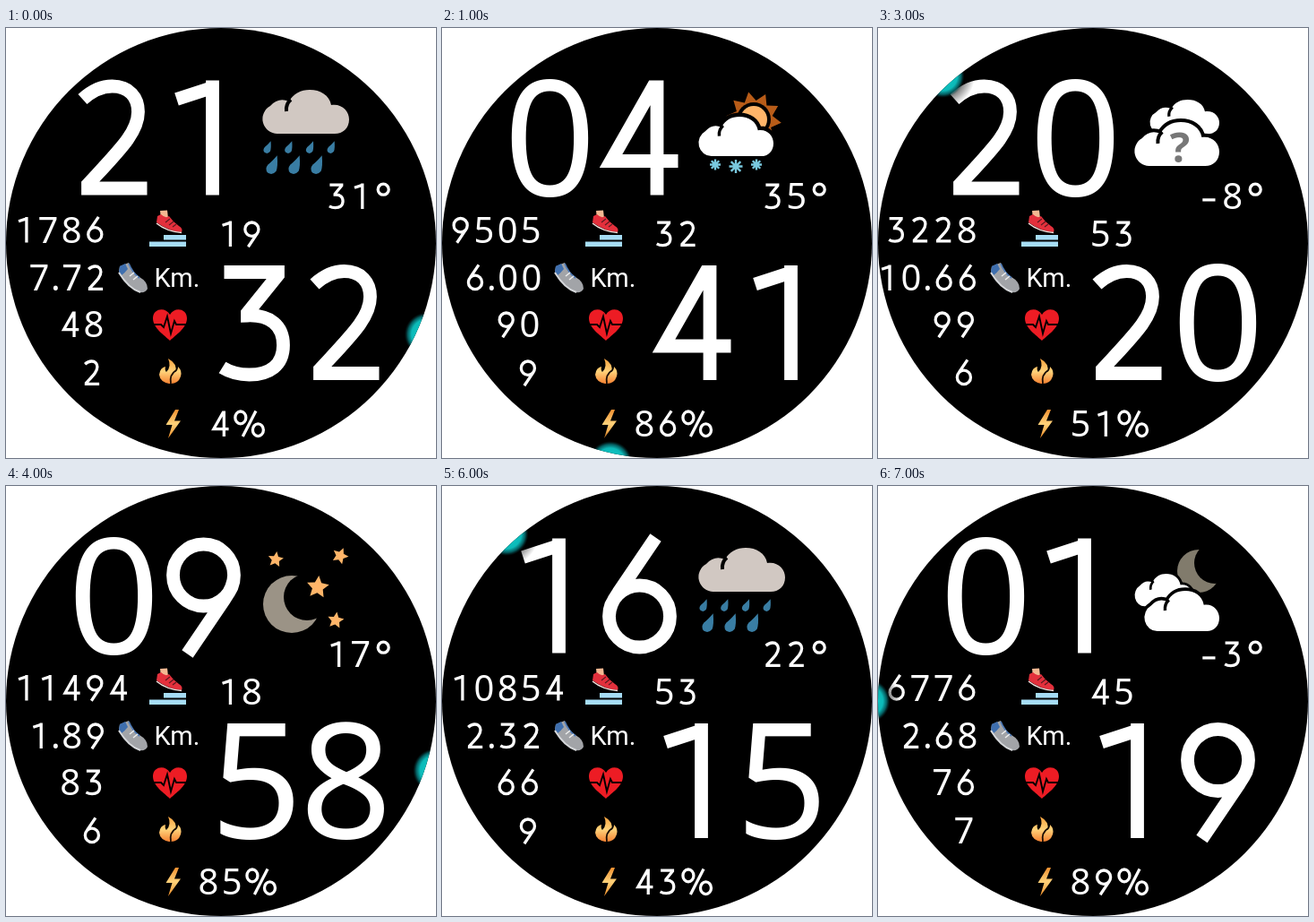
Write an HTML page with a canvas that moves like this. It is 480 px wide and 480 px high and loops after 8000 ms.

```html
<!DOCTYPE html>
<html lang="en">
<head>
<meta charset="utf-8">
<title>Watch face</title>
<style>
  html, body { margin: 0; width: 100%; height: 100%; overflow: hidden; background: #fff; }
  canvas { display: block; width: 480px; height: 480px; }
</style>
</head>
<body>
<canvas id="face" width="480" height="480"></canvas>
<script>
const ctx = document.getElementById('face').getContext('2d');
const STEP = 1000, PITCH = 26.2, SMALL = 40, BIG = 180;
const FONT = '"Noto Sans", sans-serif';

// Humanist numerals, centred on x = 0 with the baseline at y = 0, for size 180.
const SIX = 'M18 -129L-24 -67Q-34 -53 -34 -41A34 34.5 0 1 0 34 -41A34 34.5 0 0 0 -34 -41';
const GLYPHS = {
  1: 'M10 0V-128M13 -121L-30 -107',
  2: 'M-35 -107Q-19 -121.5 -2 -121.5C17 -121.5 27 -109 27 -93C27 -70 7 -51 -29 -12V-7.5H37',
  3: 'M-36 -120.5H24V-117L-10 -75V-72C15 -73 30 -61 30 -39C30 -16 14 -6 -8 -6Q-25 -6 -38 -14',
  4: 'M19.5 0V-120.5H15L-32 -38H43',
  6: SIX,
  9: SIX,
  '-': 'M-32 -46H32',
  '°': 'M27 -98A27 27 0 1 1 -27 -98A27 27 0 1 1 27 -98Z',
  '%': 'M-17 -95A27 31 0 1 1 -71 -95A27 31 0 1 1 -17 -95ZM71 -33A27 31 0 1 1 17 -33A27 31 0 1 1 71 -33ZM-33 0L33 -128'
};
for (const key in GLYPHS) GLYPHS[key] = new Path2D(GLYPHS[key]);

const WIDTHS = { '.': 10.5, '%': 39, '°': 25 };
const widthOf = (char, pitch) => WIDTHS[char] || pitch;

const SCENES = [
  { hour: '21', minute: '32', second: 19, steps: 1786, km: '7.72', pulse: 48, burn: 2, power: 4, temp: 31, sky: rain },
  { hour: '04', minute: '41', second: 32, steps: 9505, km: '6.00', pulse: 90, burn: 9, power: 86, temp: 35, sky: sunSnow },
  { hour: '13', minute: '07', second: 53, steps: 8240, km: '4.15', pulse: 72, burn: 4, power: 67, temp: 8, sky: moonClouds },
  { hour: '20', minute: '20', second: 53, steps: 3228, km: '10.66', pulse: 99, burn: 6, power: 51, temp: -8, sky: unknown },
  { hour: '09', minute: '58', second: 18, steps: 11494, km: '1.89', pulse: 83, burn: 6, power: 85, temp: 17, sky: moonStars },
  { hour: '18', minute: '26', second: 32, steps: 7352, km: '10.24', pulse: 58, burn: 3, power: 72, temp: 24, sky: sunSnow },
  { hour: '16', minute: '15', second: 53, steps: 10854, km: '2.32', pulse: 66, burn: 9, power: 43, temp: 22, sky: rain },
  { hour: '01', minute: '19', second: 45, steps: 6776, km: '2.68', pulse: 76, burn: 7, power: 89, temp: -3, sky: moonClouds }
];

function glyph(char, x, y, size) {
  ctx.fillStyle = ctx.strokeStyle = '#fff';
  if (!GLYPHS[char]) {
    ctx.font = `${size}px ${FONT}`;
    ctx.textAlign = 'center';
    ctx.fillText(char, x, y);
    return;
  }
  ctx.save();
  ctx.translate(x, y);
  ctx.scale(size / BIG, size / BIG);
  if (char === '9') {
    ctx.translate(0, -128);
    ctx.rotate(Math.PI);
  }
  ctx.lineWidth = 14.8;
  ctx.stroke(GLYPHS[char]);
  ctx.restore();
}

// align: 0 = left, 0.5 = centre, 1 = right
function label(value, x, y, align, size = SMALL, pitch = PITCH) {
  const chars = [...String(value)];
  const total = chars.reduce((sum, c) => sum + widthOf(c, pitch), 0);
  let left = x - total * align;
  for (const c of chars) {
    const w = widthOf(c, pitch);
    glyph(c, left + w / 2, y, size);
    left += w;
  }
}

function fill(d, color) {
  ctx.fillStyle = color;
  ctx.fill(new Path2D(d));
}

function line(d, color, width) {
  ctx.strokeStyle = color;
  ctx.lineWidth = width;
  ctx.stroke(new Path2D(d));
}

function disc(x, y, r, color) {
  ctx.fillStyle = color;
  ctx.beginPath();
  ctx.arc(x, y, r, 0, Math.PI * 2);
  ctx.fill();
}

function cloud(x, y, w, h, color, gap = 0) {
  ctx.save();
  ctx.translate(x, y);
  ctx.scale(w / 96, h / 50);
  const body = 'M16 49A16.5 16.5 0 0 1 8 18Q17 8 29 13C34 4 42 0 52 0C64 0 74 6 76 17C88 15 96 24 96 33C96 43 89 49 80 49Z';
  ctx.lineJoin = 'round';
  if (gap) line(body, '#000', gap * 2);
  fill(body, color);
  line('M31 11Q25 16 26 24', '#000', 4);
  ctx.restore();
}

function crescent(x, y, r, cutX, cutY, cutR, color) {
  disc(x, y, r, color);
  disc(cutX, cutY, cutR, '#000');
}

function star(x, y, r, turn, points = 5, inner = 0.48, color = '#ffb569') {
  ctx.fillStyle = color;
  ctx.beginPath();
  for (let i = 0; i < points * 2; i++) {
    const a = turn + i * Math.PI / points;
    const d = i % 2 ? r * inner : r;
    ctx.lineTo(x + d * Math.sin(a), y - d * Math.cos(a));
  }
  ctx.fill();
}

function drop(x, y, s) {
  ctx.save();
  ctx.translate(x, y);
  ctx.scale(s, s);
  fill('M6 -10Q7 2 5 7Q1 12 -4 9Q-8 5 -4 0Q0 -3 6 -10Z', '#397da3');
  ctx.restore();
}

function flake(x, y, r) {
  ctx.strokeStyle = '#79c9df';
  ctx.lineWidth = 2.4;
  ctx.beginPath();
  for (let i = 0; i < 4; i++) {
    const dx = r * Math.cos(i * Math.PI / 4), dy = r * Math.sin(i * Math.PI / 4);
    ctx.moveTo(x - dx, y - dy);
    ctx.lineTo(x + dx, y + dy);
  }
  ctx.stroke();
}

function rain() {
  cloud(287, 69, 96, 50, '#d1c8c2');
  for (let i = 0; i < 4; i++) drop(291.5 + 23.7 * i, 133, 0.68);
  for (let i = 0; i < 3; i++) drop(296.5 + 25 * i, 152.5, 1.03);
}

function sunSnow() {
  star(348, 102, 31, -0.19, 10, 0.68, '#b85c18');
  disc(348, 102, 19, '#000');
  disc(348, 102, 15, '#ffb569');
  cloud(287, 99, 83, 45, '#fff', 5);
  flake(305, 152.5, 6);
  flake(328, 154.5, 7.5);
  flake(351, 152.5, 6);
}

function unknown() {
  cloud(304, 80, 77, 39, '#fff');
  cloud(287, 105, 94, 50, '#fff', 4);
  ctx.fillStyle = '#777';
  ctx.textAlign = 'center';
  ctx.font = `bold 47px ${FONT}`;
  ctx.fillText('?', 337, 150);
}

function moonStars() {
  crescent(319, 132, 32, 336, 124, 26, '#9b9386');
  star(301, 82, 9, 0.15);
  star(373, 78, 9.5, 0.4);
  star(348, 113, 13, 0.1);
  star(368, 150, 9.5, 0.15);
}

function moonClouds() {
  crescent(358, 95, 24, 376, 86, 23, '#817b6c');
  cloud(287, 98, 64, 37, '#fff', 4);
  cloud(298, 117, 83, 46, '#fff', 4);
}

function stairs() {
  fill('M176 231H201V236.5H176ZM160 238.5H201V244H160Z', '#a6ddf5');
  fill('M172 204L180 203.5L181 212L173 213Z', '#f4b892');
  fill('M169 210L173 208Q178 213 182 210Q186 216 193 221Q198 224 196 228Q182 227 168 217Z', '#e3303c');
  line('M168 218Q179 227 196 228.5', '#f0dcd8', 1.6);
  line('M178 217L183 213M182 220L187 216M186 222L190 219', '#5a1a20', 1.2);
}

function sneaker() {
  fill('M127 266L137 262Q141 273 149 278Q158 283 158 291Q156 296 149 295Q137 291 126 272Z', '#a2a4a8');
  fill('M127 266L133 263L136 269Q133 273 129 276L126 272Z', '#3f6fae');
  line('M137 263Q141 273 149 279', '#4d79b5', 1.8);
  line('M126 273Q137 291 150 295', '#d5d7da', 2);
  line('M138 277L143 273M142 281L147 277', '#eee', 1.5);
}

function heart() {
  fill('M183 349C177 343 164 335 164 324C164 313 178 311 183 320C188 311 202 313 202 324C202 335 189 343 183 349Z', '#ed1c24');
  line('M164 331H173L176 334L180 322L184 341L188 327L190 331H202', '#000', 1.9);
}

function flame() {
  const g = ctx.createLinearGradient(0, 369, 0, 398);
  g.addColorStop(0, '#f9a23c');
  g.addColorStop(0.5, '#ffd27a');
  g.addColorStop(1, '#f47c2c');
  fill('M181 369Q192 375 189 384Q192 382 192 378Q197 383 195 389Q192 398 182 397Q172 395 171 387Q172 379 178 378Q177 382 179 384Q185 378 181 369Z', g);
  line('M190 382Q182 387 184 397', '#1a0d03', 1.8);
}

function bolt() {
  const g = ctx.createLinearGradient(0, 426, 0, 458);
  g.addColorStop(0, '#f09030');
  g.addColorStop(0.5, '#ffd27a');
  g.addColorStop(1, '#ee8a24');
  fill('M189 426L178.5 443H185.5L181 458L195 438.5H188L193 426Z', g);
}

function secondGlow(second) {
  const a = second * Math.PI / 30;
  const x = 240 + 251 * Math.sin(a), y = 240 - 251 * Math.cos(a);
  const g = ctx.createRadialGradient(x, y, 0, x, y, 36);
  g.addColorStop(0, '#10d0cc');
  g.addColorStop(0.46, '#0cb9b8');
  g.addColorStop(0.58, 'rgba(5,95,98,0.95)');
  g.addColorStop(0.68, 'rgba(0,0,0,0.45)');
  g.addColorStop(1, 'rgba(0,0,0,0)');
  disc(x, y, 36, g);
}

function draw(s) {
  ctx.fillStyle = '#fff';
  ctx.fillRect(0, 0, 480, 480);
  ctx.save();
  ctx.beginPath();
  ctx.arc(240, 240, 240, 0, Math.PI * 2);
  ctx.clip();
  ctx.fillStyle = '#000';
  ctx.fillRect(0, 0, 480, 480);

  s.sky();
  [stairs, sneaker, heart, flame, bolt].forEach(icon => icon());

  label(s.hour, 170.5, 186.5, 0.5, BIG, 100);
  label(s.minute, 329.5, 393, 0.5, BIG, 100);
  label(s.second, 261.3, 244, 0.5);
  label(s.temp + '°', 395, 202, 0.5);
  label(s.steps, 7.6, 239.5, 0);
  label(s.km, 113, 293, 1);
  label(s.pulse, 111, 345, 1);
  label(s.burn, 109, 399, 1);
  label(s.power + '%', 258.5, 456, 0.5);

  ctx.fillStyle = '#fff';
  ctx.font = '29px Roboto, sans-serif';
  ctx.textAlign = 'left';
  ctx.fillText('Km.', 165.5, 289);

  secondGlow(s.second);
  ctx.restore();
}

const start = performance.now();
function tick() {
  const elapsed = performance.now() - start;
  draw(SCENES[Math.floor(elapsed / STEP) % SCENES.length]);
  requestAnimationFrame(tick);
}
tick();
</script>
</body>
</html>
```
